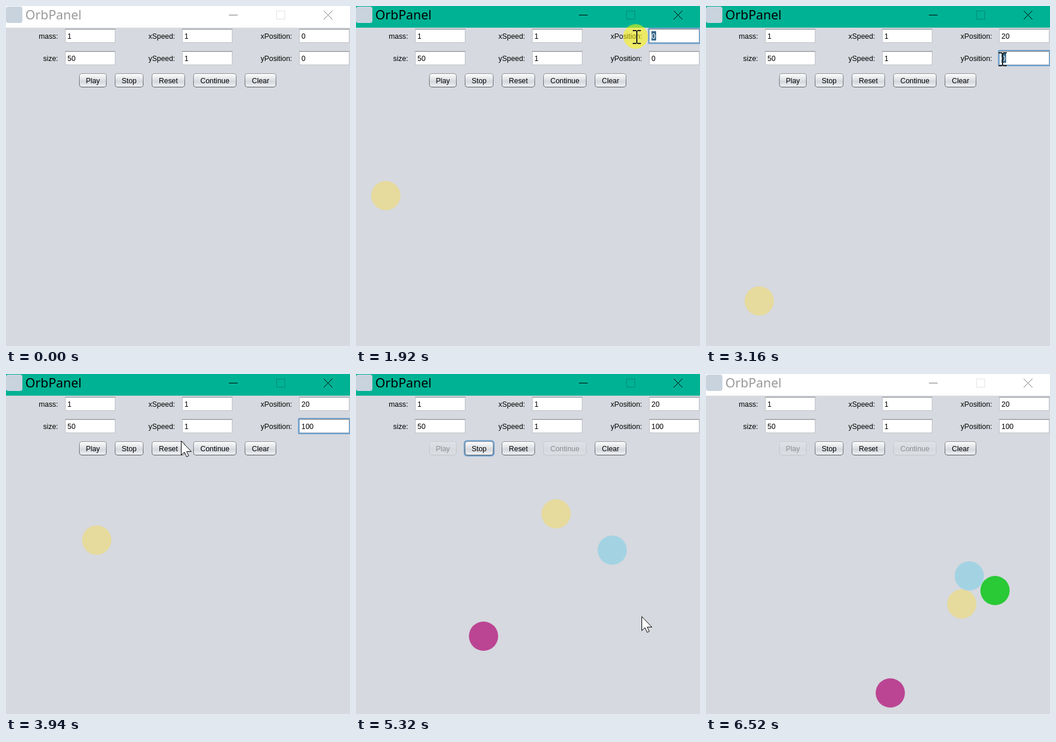
An HTML page with a canvas for the animation above (6.54 s loop, 588x581 px).

```html
<!DOCTYPE html>
<html lang="en">
<head>
<meta charset="utf-8">
<title>OrbPanel</title>
<style>
html, body { margin: 0; width: 100%; height: 100%; overflow: hidden; background: #d6d9df; }
canvas { display: block; }
</style>
</head>
<body>
<canvas id="stage" width="588" height="581"></canvas>
<script>
const ctx = document.getElementById('stage').getContext('2d');
const LOOP = 6540, STEP = 20;
const UI_FONT = '12.4px "Liberation Sans", Arial, sans-serif';
const RING = '#73a4d1';

const within = (t, a, b) => t >= a && t < b;

// Value of the last [time, value] pair that has started.
const latest = (keys, t) => keys.filter(k => k[0] <= t).pop()[1];

// Linear interpolation over rows of [time, ...values].
function track(keys, t) {
  const last = keys[keys.length - 1];
  if (t >= last[0]) return last.slice(1);
  const i = Math.max(1, keys.findIndex(k => k[0] > t));
  const a = keys[i - 1], b = keys[i];
  const p = Math.max(0, (t - a[0]) / (b[0] - a[0]));
  return a.slice(1).map((v, j) => v + (b[j + 1] - v) * p);
}

// Position folded back and forth between two walls.
function bounce(v, lo, hi) {
  const span = hi - lo;
  const m = (((v - lo) % (2 * span)) + 2 * span) % (2 * span);
  return lo + (m > span ? 2 * span - m : m);
}

function text(str, x, y, color = '#000', align = 'left', font = UI_FONT) {
  ctx.font = font;
  ctx.textAlign = align;
  ctx.fillStyle = color;
  ctx.fillText(str, x, y);
}

function box(x, y, w, h, r, fill) {
  ctx.beginPath();
  ctx.roundRect(x, y, w, h, r);
  ctx.fillStyle = fill;
  ctx.fill();
}

function lines(color, ...segments) {
  ctx.beginPath();
  for (const [x1, y1, x2, y2] of segments) {
    ctx.moveTo(x1, y1);
    ctx.lineTo(x2, y2);
  }
  ctx.strokeStyle = color;
  ctx.lineWidth = 1;
  ctx.stroke();
}

function disc(x, y, r, color) {
  ctx.beginPath();
  ctx.arc(x, y, r, 0, 7);
  ctx.fillStyle = color;
  ctx.fill();
}

function titleBar(active) {
  const ink = active ? '#000' : '#777';
  ctx.fillStyle = active ? '#00b294' : '#fff';
  ctx.fillRect(0, 0, 588, 37);
  box(0, 1, 28, 28, 4, '#c8d3de');
  text('OrbPanel', 33, 23, active ? '#000' : '#999', 'left',
    '21.8px "Noto Sans", "Open Sans", sans-serif');
  lines(ink, [381, 15.5, 396, 15.5], [543, 8, 558, 23], [558, 8, 543, 23]);
  ctx.strokeStyle = active ? '#008a73' : '#e4e4e4';
  ctx.strokeRect(462.5, 8.5, 14, 14);
}

function field(label, value, x, y, focused, selected) {
  text(label, x - 12, y + 17, '#000', 'right');
  if (focused) box(x - 2, y - 2, 90, 28, 2, RING);
  ctx.fillStyle = focused ? '#8aa5bd' : '#bfc2c7';
  ctx.fillRect(x, y, 86, 24);
  ctx.fillStyle = '#fff';
  ctx.fillRect(x + 1, y + 1, 84, 22);
  ctx.fillStyle = '#8c8e92';
  ctx.fillRect(x, y, 86, 1);
  ctx.fillStyle = '#dfe0e2';
  ctx.fillRect(x + 1, y + 1, 84, 1);
  if (selected) {
    ctx.fillStyle = '#39698a';
    ctx.fillRect(x + 4, y + 4, 8, 16);
  }
  text(value, x + 4, y + 17, selected ? '#fff' : '#000');
}

function button(label, x, w, disabled, focused) {
  const y = 115, h = 24;
  if (focused) box(x - 2, y - 2, w + 4, h + 4, 6, RING);
  const edge = ctx.createLinearGradient(0, y, 0, y + h);
  edge.addColorStop(0, disabled ? '#c9ccd1' : '#94979c');
  edge.addColorStop(1, disabled ? '#bfc2c7' : '#55585d');
  box(x, y, w, h, 5, edge);
  const face = ctx.createLinearGradient(0, y + 1, 0, y + h - 1);
  const shades = disabled ? ['#dfe2e6', '#d6d9de', '#dcdfe3']
                          : ['#fcfcfd', '#d5d8dd', '#eff1f3'];
  [0, 0.6, 1].forEach((p, i) => face.addColorStop(p, shades[i]));
  box(x + 1, y + 1, w - 2, h - 2, 4, face);
  text(label, x + w / 2, y + 17, disabled ? '#8e8f91' : '#000', 'center');
}

const buttons = [
  ['Play', 125, 47], ['Stop', 186, 49], ['Reset', 249, 57],
  ['Continue', 320, 74], ['Clear', 408, 54]
];

function form(t, active) {
  const playing = t >= 4090;
  const focus = active &&
    latest([[0, 'mass'], [1620, 'xPosition'], [2860, 'yPosition'], [4090, 'Stop']], t);
  const xText = latest([[0, '0'], [2350, '2'], [2500, '20']], t);
  const yText = latest([[0, '0'], [3560, '1'], [3660, '10'], [3760, '100']], t);
  const rows = [
    [['mass', '1'], ['xSpeed', '1'], ['xPosition', xText, within(t, 1800, 2350)]],
    [['size', '50'], ['ySpeed', '1'], ['yPosition', yText, within(t, 2950, 3560)]]
  ];
  rows.forEach((row, r) => row.forEach(([name, value, selected], c) =>
    field(name + ':', value, 101 + 200 * c, 39 + 38 * r, focus === name, selected)));
  for (const [label, x, w] of buttons) {
    const disabled = playing && (label === 'Play' || label === 'Continue');
    button(label, x, w, disabled, focus === label);
  }
}

// Game ticks; the clock runs faster after Play is pressed.
const ticks = [[390, -47], [1000, 0], [1920, 71], [3160, 167], [4110, 245],
  [4600, 314], [5320, 418], [5440, 429], [6520, 513.2]];
const magenta = [[4110, 45], [4600, 114], [5320, 218], [5440, 229], [6520, 315]];
const blue = [[5056, 476, 414], [5320, 438, 301], [5440, 427, 268],
  [5800, 398, 181], [6520, 450, 345]];
const green = [[5800, 442, 206], [6520, 494, 370]];

function balls(t) {
  const draw = (keys, color, place) => {
    if (t < keys[0][0]) return;
    const [x, y] = place(...track(keys, t));
    disc(x, y, 25, color);
  };
  draw(ticks, '#e6da9c', n => [bounce(122 - n, 23, 563), bounce(429 + 5 * n, 174, 554)]);
  draw(magenta, '#bb4593', x => [x, x + 230]);
  draw(blue, '#a3d3e3', (x, y) => [x, y]);
  draw(green, '#2ac936', (x, y) => [x, y]);
}

const pointer = [[220, 330, 540], [380, 183, 193], [1150, 183, 193], [1470, 508, 53],
  [1700, 508, 53], [1860, 480, 53], [2080, 480, 53], [2250, 514, 57], [2750, 514, 57],
  [2860, 514, 91], [2960, 507, 91], [3800, 507, 91], [4040, 150, 131], [4620, 150, 131],
  [4780, 403, 300], [5000, 488, 414], [5440, 488, 414], [5740, 455, 206],
  [5850, 455, 206], [6100, 370, 370], [6400, 330, 585]];
const clicks = [[370, 440], [1620, 2080], [2860, 3000], [4050, 4120], [5030, 5100], [5770, 5840]];

const arrow = new Path2D(
  'M.5 .5V24.5L6 19.5L9.8 27.5L13.3 25.8L9.8 18.5H17.8Z');

function cursor(t) {
  if (!within(t, 220, 6400)) return;
  const [x, y] = track(pointer, t);
  if (clicks.some(([a, b]) => within(t, a, b))) disc(x - 2, y - 1, 21, 'rgba(255,250,0,.55)');
  const beam = within(t, 1620, 2080) || (x > 500 && y < 102);
  ctx.save();
  ctx.translate(Math.round(x), Math.round(y));
  if (beam) {
    ctx.fillStyle = '#222';
    ctx.fillRect(-7, -12, 6, 2);
    ctx.fillRect(1, -12, 6, 2);
    ctx.fillRect(-7, 10, 6, 2);
    ctx.fillRect(1, 10, 6, 2);
    ctx.fillRect(-1, -11, 2, 22);
  } else {
    ctx.fillStyle = '#fff';
    ctx.fill(arrow);
    ctx.strokeStyle = '#000';
    ctx.lineWidth = 1;
    ctx.stroke(arrow);
  }
  ctx.restore();
}

function frame() {
  const t = Math.floor((performance.now() % LOOP) / STEP) * STEP;
  const active = within(t, 240, 6440);
  ctx.fillStyle = '#d6d9df';
  ctx.fillRect(0, 0, 588, 581);
  titleBar(active);
  form(t, active);
  balls(t);
  cursor(t);
  requestAnimationFrame(frame);
}
frame();
</script>
</body>
</html>
```
